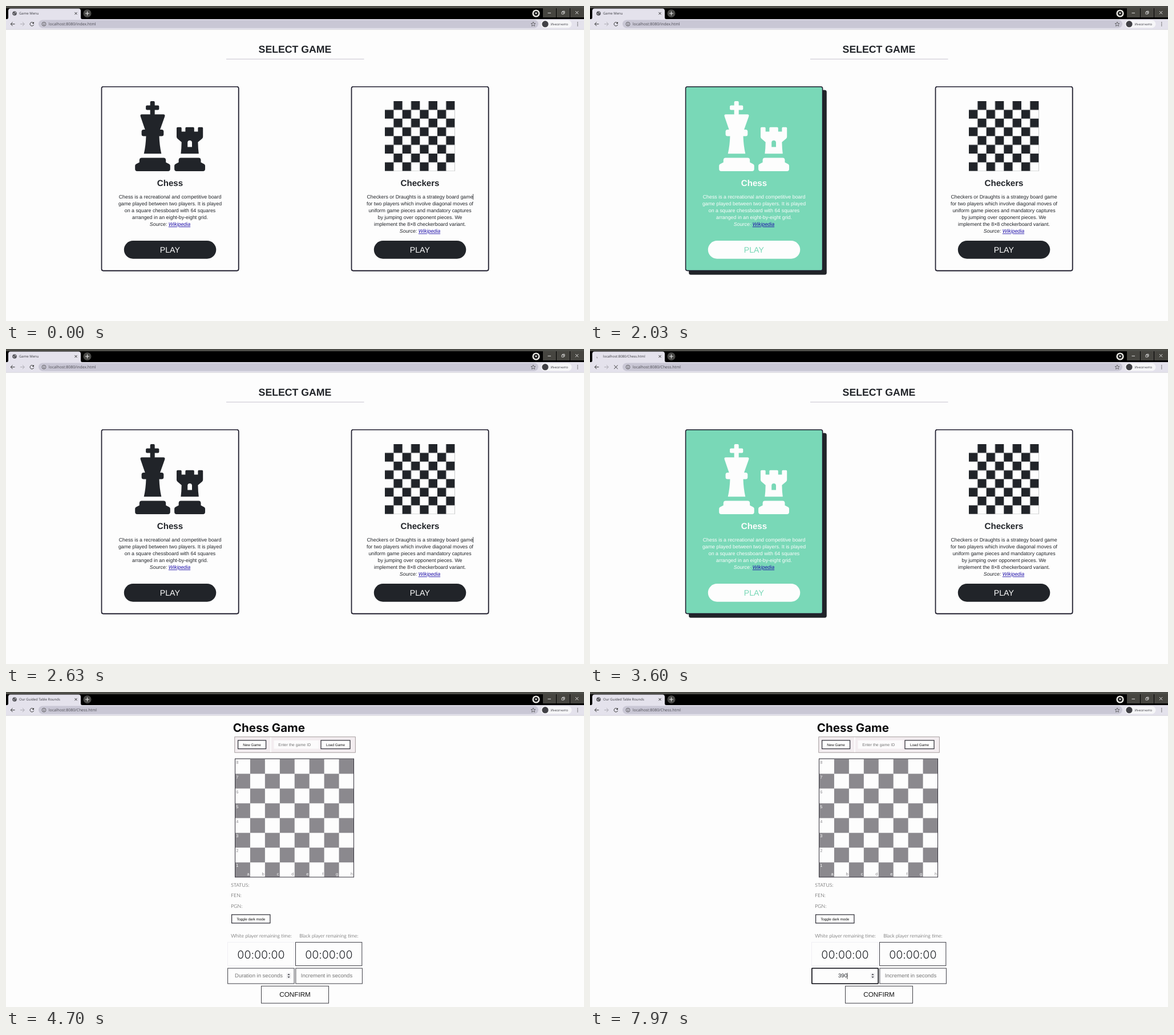
Write an HTML page that moves like this. It is 1013 px wide and 553 px high and loops after 8 s.

```html
<!DOCTYPE html>
<html lang="en">
<head>
<meta charset="utf-8">
<title>Game Menu</title>
<style>
@property --bg { syntax: "<color>"; inherits: true; initial-value: #fdfdfd; }
@property --fg { syntax: "<color>"; inherits: true; initial-value: #212429; }
@property --lift { syntax: "<length>"; inherits: true; initial-value: 0px; }

html, body { margin: 0; width: 100%; height: 100%; overflow: hidden; background: #fdfdfd; }
svg { display: block; width: 100%; height: 100%; }
text { font-family: "Liberation Sans", Arial, sans-serif; text-rendering: geometricPrecision; fill: #212429; }
.mid text, text.mid { text-anchor: middle; }
.ui text { font-family: "Open Sans", "Noto Sans", sans-serif; fill: #3a3a40; }
.ui .title { font-size: 6px; }
.ui .url { font-size: 6.87px; fill: #4b4a52; }
.line { fill: none; stroke: #3f3f46; stroke-width: 1; }

/* menu cards */
.shadow { fill: #212429; transform: translate(var(--lift), var(--lift)); }
.frame { fill: var(--bg); stroke: #211f30; stroke-width: 1.6; }
.ink, .card text { fill: var(--fg); }
.hole, .card .play { fill: var(--bg); }
.card .name { font-size: 15.1px; font-weight: bold; }
.about { font-size: 8.87px; }
.card .link { fill: #1a0aa8; text-decoration: underline; }
.play { font-size: 14.1px; }

/* game page */
.btn { fill: #fdfdfd; stroke: #2a2a33; stroke-width: 1.2; }
.small text { font-size: 6.3px; fill: #111; }
.thin text { font-family: Lato, "Open Sans", sans-serif; font-weight: 300; fill: #333; }
.clock text { font-family: Inter, Roboto, sans-serif; font-weight: 300; font-size: 19.5px; font-feature-settings: "calt" 0; }
.field text { font-size: 9.5px; }
.field .hint, .hint { fill: #757575; }
.rank, .file { font-size: 7.4px; }
.file { text-anchor: end; }
.onlight { fill: #8b898e; }
.ondark { fill: #fff; }

/* timeline: 1% = 80 ms */
.card { animation: 8s linear infinite; }
.chess { animation-name: chess; }
.checkers { animation-name: checkers; }
@keyframes chess {
  0%, 23.375%, 32.25%, 33.25% { --bg: #fdfdfd; --fg: #212429; --lift: 0px; }
  25%, 30.5%, 35%, 99.9% { --bg: #79d8b7; --fg: #fdfdfd; --lift: 6.4px; }
}
@keyframes checkers {
  0%, 0.375%, 11.75%, 100% { --bg: #fdfdfd; --fg: #212429; --lift: 0px; }
  2.25%, 9.875% { --bg: #79d8b7; --fg: #fdfdfd; --lift: 6.4px; }
}
.cut { animation: 8s step-end infinite; }
.menu { animation-name: menu; }
.game { animation-name: game; }
.before { animation-name: before; }
.after { animation-name: after; }
.loading { animation-name: loading; }
.idle { animation-name: idle; }
.loaded { animation-name: loaded; }
.mark { animation-name: mark; }
.focus { animation-name: focus; }
.empty { animation-name: empty; }
.one { animation-name: one; }
.two { animation-name: two; }
.three { animation-name: three; }
.caret { animation-name: blink, shift; }
@keyframes menu { 0% { opacity: 1 } 46.5%, 100% { opacity: 0 } }
@keyframes game { 0% { opacity: 0 } 46.5%, 100% { opacity: 1 } }
@keyframes before { 0% { opacity: 1 } 43.5%, 100% { opacity: 0 } }
@keyframes after { 0% { opacity: 0 } 43.5%, 100% { opacity: 1 } }
@keyframes loading { 0%, 47%, 100% { opacity: 0 } 43.5% { opacity: 1 } }
@keyframes idle { 0%, 47%, 100% { opacity: 1 } 43.5% { opacity: 0 } }
@keyframes loaded { 0% { opacity: 0 } 47%, 100% { opacity: 1 } }
@keyframes mark {
  0%, 12.8%, 26.125%, 39.875% { opacity: 1 }
  6.25%, 19.5%, 33.35%, 43.5%, 100% { opacity: 0 }
}
@keyframes focus { 0% { opacity: 0 } 68.75%, 100% { opacity: 1 } }
@keyframes empty { 0% { opacity: 1 } 81.75%, 100% { opacity: 0 } }
@keyframes one { 0%, 84%, 100% { opacity: 0 } 81.75% { opacity: 1 } }
@keyframes two { 0%, 86.75%, 100% { opacity: 0 } 84% { opacity: 1 } }
@keyframes three { 0% { opacity: 0 } 86.75%, 100% { opacity: 1 } }
@keyframes blink {
  0%, 75.5%, 93% { opacity: 0 }
  68.75%, 81.75%, 99.6%, 100% { opacity: 1 }
}
@keyframes shift {
  0% { transform: translateX(0) }
  81.75% { transform: translateX(2.6px) }
  84% { transform: translateX(5.3px) }
  86.75%, 100% { transform: translateX(7.9px) }
}
.spin { transform-origin: 15px 13px; animation: spin 1s linear infinite; }
@keyframes spin { to { transform: rotate(360deg) } }
</style>
</head>
<body>
<svg viewBox="0 0 1013 553" preserveAspectRatio="none">
  <defs>
    <pattern id="checks" patternUnits="userSpaceOnUse" x="664" y="167" width="30.66" height="30.7">
      <path class="ink" d="M15.33 0h15.33v15.35H15.33zM0 15.35h15.33V30.7H0z"/>
    </pattern>
    <pattern id="board" patternUnits="userSpaceOnUse" x="402" y="117.6" width="51.88" height="51.88">
      <path fill="#8b898e" d="M25.94 0h25.94v25.94H25.94zM0 25.94h25.94v25.94H0z"/>
    </pattern>
  </defs>
  <rect width="1013" height="553" fill="#fdfdfd"/>

  <!-- browser window -->
  <g class="ui">
    <rect width="1013" height="23" fill="#000"/>
    <rect width="1013" height="4" fill="#4d4d48"/>
    <path fill="#464540" d="M941 4h23v16h-23zM965 4h23v16h-23zM989 4h24v16h-24z"/>
    <path d="M949.5 12.3h5.5M998 9l5.2 5.2M1003.2 9l-5.2 5.2" stroke="#eee" fill="none" stroke-width=".9"/>
    <path d="M974 10.5h3.6v3.6H974zM975.4 10.3v-1.2h3.6v3.7h-1.2" stroke="#eee" fill="none" stroke-width=".8"/>
    <circle cx="929" cy="13" r="6.6" fill="#ecebe6"/>
    <circle cx="929" cy="13" r="4.2" fill="#222"/>
    <path d="M926.8 11.8h4.4l-2.2 2.8z" fill="#fff"/>
    <circle cx="142.5" cy="13" r="7" fill="#4a4a48"/>
    <path d="M139 13h7M142.5 9.5v7" stroke="#eee"/>
    <path fill="#e4e2ec" d="M0 23h1.5Q4 23 4 20V8.5Q4 4.5 8 4.5H127Q131 4.5 131 8.5V20Q131 23 133.500 23H1013V41H0z"/>
    <path d="M0 41.3h1013" stroke="#c9c9cf" stroke-width=".7"/>
    <rect x="57" y="24.5" width="876" height="14.2" rx="7.1" fill="#c9c7d5"/>
    <path d="M120.400 10.900l4.200 4.200M124.600 10.900l-4.200 4.200" stroke="#222" stroke-width=".9"/>
    <g class="cut idle">
      <circle cx="15" cy="13" r="3.8" fill="#55555a"/>
      <path d="M12.300 12.200l2.400 1.200-.5 2.200zM15.200 10l2.300 1.500-1.300 1.500z" fill="#d8d7df"/>
    </g>
    <g class="cut loading">
      <path class="spin" d="M14.800 9.600a3.400 3.400 0 0 1 2.400 .800" fill="none" stroke="#666" stroke-width=".9"/>
    </g>
    <text class="title cut before" x="23" y="15.200">Game Menu</text>
    <text class="title cut loading" x="23" y="15.200">localhost:8080/Chess.html</text>
    <text class="title cut loaded" x="23" y="15.200">Our Guided Table Rounds</text>

    <path d="M15.500 31.700H8.500M11.600 28.300L8.200 31.700l3.400 3.400" fill="none" stroke="#333"/>
    <path d="M25 31.700h7M28.900 28.300l3.400 3.400-3.400 3.400" fill="none" stroke="#aaa9b1"/>
    <g class="cut idle">
      <path d="M48.200 30a3.300 3.300 0 1 0 .4 2.600" fill="none" stroke="#333"/>
      <path d="M49 27.800v3.300h-3.300z" fill="#333"/>
    </g>
    <path class="cut loading" d="M42.200 28.500l6.400 6.400M48.600 28.500l-6.400 6.400" stroke="#333"/>
    <circle cx="66.500" cy="31.700" r="3.400" fill="none" stroke="#444" stroke-width=".8"/>
    <path d="M66.500 29.800v.9M66.500 31.300v2.400" stroke="#444" stroke-width=".9"/>
    <text class="url cut before" x="74.800" y="34.100">localhost:8080/index.html</text>
    <text class="url cut after" x="74.800" y="34.100">localhost:8080/Chess.html</text>
    <path d="M924 27.900l1.100 2.600 2.800.2-2.100 1.800.7 2.800-2.500-1.500-2.500 1.500.7-2.800-2.100-1.800 2.800-.2z" fill="none" stroke="#444" stroke-width=".7"/>
    <rect x="937.500" y="25" width="54" height="13.500" rx="6.700" fill="#f6f6f8"/>
    <circle cx="945" cy="31.700" r="5.600" fill="#414146"/>
    <text x="954.500" y="33.800" font-size="5.800">Инкогнито</text>
    <path d="M1001.800 28.200v1.300M1001.800 31.100v1.300M1001.800 34v1.300" stroke="#444" stroke-width="1.300"/>
  </g>

  <!-- game menu -->
  <g class="cut menu">
    <text class="mid" x="506.500" y="82.300" font-size="17.700" font-weight="bold">SELECT GAME</text>
    <path d="M386 93.200h241.500" stroke="#c5c3cf"/>
    <g class="card chess">
      <rect class="shadow" x="166.800" y="141" width="241.600" height="324.400" rx="3.500"/>
      <rect class="frame" x="167.600" y="141.800" width="240" height="322.800" rx="3"/>
      <g class="ink">
        <rect x="252.700" y="167" width="8" height="24.500" rx="2"/>
        <rect x="245.100" y="174.600" width="23.200" height="8" rx="2"/>
        <path d="M238 190.300H275.800Q279.400 190.300 278.200 194L269.700 218H244L235.800 194Q234.600 190.300 238 190.300z"/>
        <rect x="237.600" y="217" width="38.700" height="11.600" rx="3.500"/>
        <path d="M245.500 228H268.500Q269 245 272.300 259.300H241.700Q245 245 245.500 228z"/>
        <path d="M238 266.600H276Q280.200 266.600 280.200 271V274.500L286 277.400Q287.800 278.300 287.800 280.500V286Q287.800 290 284 290H230Q226.200 290 226.200 286V280.500Q226.200 278.300 228 277.400L233.800 274.500V271Q233.800 266.600 238 266.600z"/>
        <path d="M301 212.800H306Q307.700 212.800 307.700 214.500V220.400H314.400V214.500Q314.400 212.800 316 212.800H328Q329.800 212.800 329.800 214.500V220.400H336.400V214.500Q336.400 212.800 338 212.800H343.500Q345.200 212.800 345.200 214.500V229.500Q345.200 231.500 343.800 232.800L336.400 239Q336.600 250 337.800 259.300H306.400Q307.600 250 307.700 239L300.400 232.800Q299 231.500 299 229.500V214.500Q299 212.800 301 212.800z"/>
        <path d="M306.500 266.600H337.500Q341.500 266.600 341.500 271V274.500L347.200 277.400Q349 278.300 349 280.500V286Q349 290 345.200 290H298.900Q295.100 290 295.100 286V280.500Q295.100 278.300 296.900 277.400L302.600 274.500V271Q302.600 266.600 306.500 266.600z"/>
      </g>
      <path class="hole" d="M318.200 247.600V240a3.900 3.900 0 0 1 7.800 0V247.600z"/>
      <g class="mid">
        <text class="name" x="287.500" y="315.500">Chess</text>
        <g class="about">
          <text x="287.500" y="337.900">Chess is a recreational and competitive board</text>
          <text x="287.500" y="350">game played between two players. It is played</text>
          <text x="287.500" y="362.100">on a square chessboard with 64 squares</text>
          <text x="287.500" y="374.200">arranged in an eight-by-eight grid.</text>
          <text x="287.500" y="386.300" font-style="italic">Source: <tspan class="link">Wikipedia</tspan></text>
        </g>
        <rect class="ink" x="206.800" y="412" width="161.500" height="31.700" rx="15.850"/>
        <text class="play" x="287.300" y="432.900">PLAY</text>
      </g>
    </g>
    <g class="card checkers">
      <rect class="shadow" x="604.800" y="141" width="241.600" height="324.400" rx="3.500"/>
      <rect class="frame" x="605.600" y="141.800" width="240" height="322.800" rx="3"/>
      <rect x="664" y="167" width="122.640" height="122.800" fill="url(#checks)"/>
      <g class="mid">
        <text class="name" x="725.500" y="315.500">Checkers</text>
        <g class="about">
          <text x="725.500" y="337.900">Checkers or Draughts is a strategy board game</text>
          <text x="725.500" y="350">for two players which involve diagonal moves of</text>
          <text x="725.500" y="362.100">uniform game pieces and mandatory captures</text>
          <text x="725.500" y="374.200">by jumping over opponent pieces. We</text>
          <text x="725.500" y="386.300">implement the 8×8 checkerboard variant.</text>
          <text x="725.500" y="398.400" font-style="italic">Source: <tspan class="link">Wikipedia</tspan></text>
        </g>
        <rect class="ink" x="644.800" y="412" width="161.500" height="31.700" rx="15.850"/>
        <text class="play" x="725.300" y="432.900">PLAY</text>
      </g>
      <rect class="ink cut mark" x="818.300" y="330" width=".8" height="10"/>
    </g>
  </g>

  <!-- chess game -->
  <g class="cut game">
    <text x="397.800" y="69.600" style="font: 700 20.500px Inter, 'Open Sans', sans-serif; fill: #0c0c0e">Chess Game</text>
    <rect x="400.800" y="78.800" width="211.500" height="27.400" fill="#f3edf0" stroke="#8f8688" stroke-width=".8"/>
    <path d="M464 79.500v26" stroke="#fdfdfd" stroke-width="1.800"/>
    <rect x="469.500" y="85" width="79" height="14.600" fill="#fcfbfc"/>
    <text class="hint" x="477.300" y="94.700" font-size="7.020">Enter the game ID</text>
    <g class="small mid">
      <rect class="btn" x="406.600" y="84.900" width="49" height="14.800"/>
      <text x="431" y="94.500">New Game</text>
      <rect class="btn" x="552" y="84.900" width="51" height="14.800"/>
      <text x="577.500" y="94.500">Load Game</text>
      <rect class="btn" x="395.600" y="390.900" width="67.300" height="14.800"/>
      <text x="429.200" y="400.500">Toggle dark mode</text>
    </g>

    <rect x="401.500" y="117.200" width="208" height="207.800" fill="url(#board)" stroke="#33313a"/>
    <text class="rank onlight" x="403.200 403.200 403.200 403.200" y="125.700 177.600 229.500 281.300">8642</text>
    <text class="rank ondark" x="403.200 403.200 403.200 403.200" y="151.600 203.500 255.400 307.300">7531</text>
    <text class="file ondark" x="426.600 478.500 530.400 582.200" y="322.300">aceg</text>
    <text class="file onlight" x="452.500 504.400 556.300 608.200" y="322.300">bdfh</text>

    <g class="thin" font-size="8.700">
      <text x="394.200" y="342">STATUS:</text>
      <text x="394.200" y="360.400">FEN:</text>
      <text x="394.200" y="378.900">PGN:</text>
    </g>
    <g class="thin mid" font-size="8.600">
      <text x="447.500" y="430.600">White player remaining time:</text>
      <text x="565.800" y="430.600">Black player remaining time:</text>
    </g>
    <g class="clock mid">
      <rect x="388.500" y="439.400" width="116.500" height="41" fill="none" stroke="#f0eff4"/>
      <text x="447" y="468.200">00:00:00</text>
      <rect class="line" x="507.500" y="439.400" width="116.300" height="41"/>
      <text x="565.800" y="468.200">00:00:00</text>
    </g>
    <g class="field mid">
      <rect class="line" x="388.600" y="485" width="116.500" height="27"/>
      <rect class="cut focus" x="388.900" y="485" width="116.300" height="27" rx="1.500" fill="#fdfdfd" stroke="#15151c" stroke-width="1.700"/>
      <text class="hint cut empty" x="443" y="501.300">Duration in seconds</text>
      <text class="cut one" x="443" y="501.300">3</text>
      <text class="cut two" x="443" y="501.300">39</text>
      <text class="cut three" x="443" y="501.300">390</text>
      <rect class="cut caret" x="442.600" y="493" width=".8" height="11" fill="#111"/>
      <rect x="491.500" y="493" width="8" height="10.400" fill="#efeff1"/>
      <path d="M493.300 497l2.200-2.600 2.200 2.600zM493.300 499.400l2.200 2.600 2.200-2.600z" fill="#44444a"/>
      <rect class="line" x="507.800" y="485" width="116.600" height="27"/>
      <text class="hint" x="562" y="501.300">Increment in seconds</text>
      <rect class="line" x="447.500" y="516.300" width="118" height="30"/>
      <text x="506.600" y="535.300" style="font-size: 11.700px; fill: #111">CONFIRM</text>
    </g>
  </g>
</svg>
</body>
</html>
```
